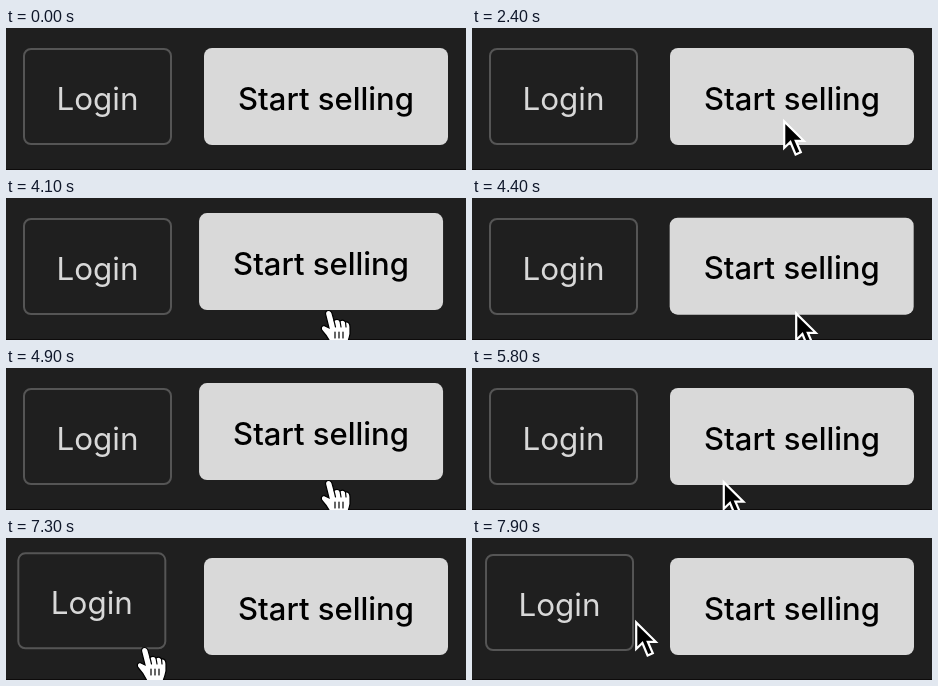
These frames come from a looping animation (460 by 142 pixels, 8 s). An HTML page:

```html
<!DOCTYPE html>
<html lang="en">
<head>
<meta charset="utf-8">
<title>Buttons</title>
<style>
  html, body { margin: 0; width: 100%; height: 100%; overflow: hidden; background: #1f1f1f; }
  svg { display: block; width: 460px; height: 142px; }
  text { font: 400 31.4px Inter, "Noto Sans", sans-serif; text-anchor: middle; }
  #start text { font-weight: 500; font-size: 31px; }
</style>
</head>
<body>
<svg viewBox="0 0 460 142">
  <rect width="460" height="142" fill="#1f1f1f"/>
  <rect y="141" width="460" height="1" fill="#0d0b0b"/>
  <g id="login">
    <rect x="18" y="21" width="147" height="95" rx="7" fill="#1f1f1f" stroke="#555" stroke-width="2"/>
    <text x="91.5" y="81.6" fill="#d8d8d8">Login</text>
  </g>
  <g id="start">
    <rect x="198" y="20" width="244" height="97" rx="8" fill="#d9d9d9"/>
    <text x="320" y="81.6" fill="#000">Start selling</text>
  </g>
  <g id="cursor">
    <path id="arrow" d="M1.2 2.4V29L7.4 23L12.600 35.500L17.800 33.200L12.800 21.800H20.800Z"
      fill="#000" stroke="#fff" stroke-width="2.2" stroke-miterlimit="8"/>
    <g id="hand" stroke="#000" stroke-width="1.2" stroke-linecap="round">
      <path d="M-3.500 3Q-3.500 -.5 -.5 -.5Q2.500 -.5 3.500 4L5 9.500Q8.500 7 11 10Q14.500 8 16.500 11Q21 10.500 21 16V23Q20 28 18 33H2Q-1 26 -7 19.500Q-9 15.500 -5 14.500L0 17Z" fill="#fff"/>
      <path d="M5 9.500L6.500 16M11 10L12 16M16.500 11L17 16M6 21V27M10 21V27M14 21V27" fill="none"/>
    </g>
  </g>
</svg>
<script>
const STEP = 100, LOOP = 8000;
const el = id => document.getElementById(id);
const clamp = k => Math.min(1, Math.max(0, k));
const smooth = k => k * k * (3 - 2 * k);

// The pointer enters at step 14, then makes these glides
const entry = { step: 14, x: 306, y: 124 };
const glides = [
  { from: 14, to: 15, dx: 0, dy: -20 },
  { from: 16, to: 20, dx: 0, dy: 8 },
  { from: 22, to: 24, dx: 5, dy: -21 },
  { from: 29, to: 33, dx: 12, dy: 22 },
  { from: 55, to: 62, dx: -184, dy: -3 },
  { from: 74, to: 79, dx: 24, dy: -28 }
];

function pointerAt(step) {
  let { x, y } = entry;
  for (const { from, to, dx, dy } of glides) {
    const k = smooth(clamp((step - from) / (to - from)));
    x += dx * k;
    y += dy * k;
  }
  return [x, y];
}

// A button at the pointer's edge keeps rising and falling
const flicker = (step, low, period, swing) =>
  4 - swing * Math.cos(2 * Math.PI * (step - low) / period + 0.25);

function startLift(step) {
  if (step < 30 || step > 52) return 0;
  return step < 35 ? 7 * (1 - 0.4 ** (step - 29)) : flicker(step, 36, 4, 3.8);
}

const loginLift = step => step < 62 ? 0 : flicker(step, 67.25, 13 / 3, 2.5);

const move = (id, x, y) => el(id).setAttribute("transform", `translate(${x} ${y})`);
const show = (id, on) => el(id).setAttribute("visibility", on ? "visible" : "hidden");

function draw(step) {
  const start = startLift(step), login = loginLift(step);
  move("start", -start, -start);
  move("login", -login, -login);
  move("cursor", ...pointerAt(step));

  const visible = step >= entry.step;
  const firstHover = step >= 28 && step < 35;
  const hand = firstHover || Math.max(start, login) > 4.5;
  show("hand", visible && hand);
  show("arrow", visible && !hand);
}

const began = performance.now();
function tick() {
  draw(Math.floor((performance.now() - began) % LOOP / STEP));
  requestAnimationFrame(tick);
}
tick();
</script>
</body>
</html>
```
